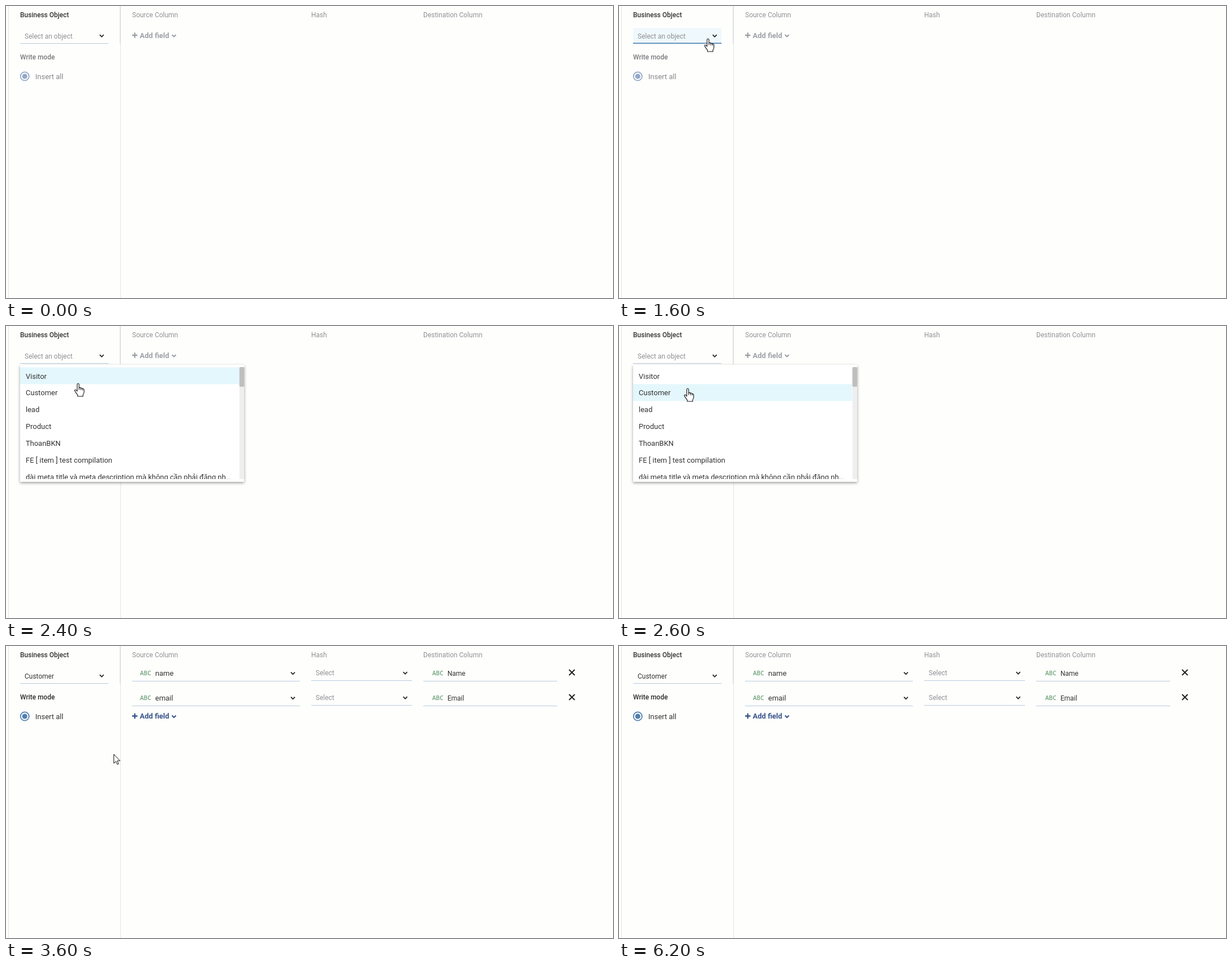
Write an HTML page that moves like this. It is 1078 by 519 pixels and loops after 7 s.

```html
<!DOCTYPE html>
<html lang="en">
<head>
<meta charset="utf-8">
<title>Field mapping</title>
<style>
  html, body { margin: 0; width: 100%; height: 100%; overflow: hidden; background: #fefefd; }
  svg { display: block; }
  text { font-family: Roboto, Arial, sans-serif; font-size: 12px; fill: #333; white-space: pre; }
  .big { font-size: 13px; }
  .med { font-weight: 500; }
  .bold { font-weight: 700; }
  .grey { fill: #8f9193; }
  .abc { font: 600 10px "Open Sans", sans-serif; fill: #6a9f78; }
  .line { stroke: #b9cbdf; }
  .rule { stroke: #e3e4e5; }
  .icon { fill: none; stroke: #222; stroke-width: 1.8; }
  .menu { filter: drop-shadow(0 2px 2.5px rgba(0, 0, 0, .38)); }
  #mode { --ink: #333; --radio: #5280af; --title: #2b2b2b; }
  #mode.off { --ink: #858789; --radio: #94a9c9; --title: #77797b; }
  #add { --add: #37548a; }
  #add.off { --add: #9da1a7; }
</style>
</head>
<body>
<svg id="stage" width="1078" height="519" viewBox="0 0 1078 519"></svg>
<script>
const LOOP = 7000;
const items = ["Visitor", "Customer", "lead", "Product", "ThoanBKN",
  "FE [ item ] test compilation",
  "dài meta title và meta description mà không cần phải đăng nh…"];

// start, cursor shape, x, y (pointer tip)
const moves = [
  [0, "", 0, 0],
  [600, "arrow", 100, 393],
  [800, "arrow", 147, 221],
  [1000, "arrow", 162, 105],
  [1200, "arrow", 162, 76],
  [1400, "hand", 158, 58],
  [2200, "hand", 141, 84],
  [2400, "hand", 128, 102],
  [2600, "hand", 122, 111],
  [3000, "arrow", 123, 113],
  [3200, "arrow", 132, 124],
  [3400, "arrow", 162, 158],
  [3600, "arrow", 191, 192],
  [3800, "arrow", 205, 217],
  [4200, "arrow", 208, 228],
  [4400, "arrow", 218, 258],
  [4600, "arrow", 227, 289],
  [4800, "arrow", 234, 304],
  [5000, "arrow", 236, 310],
  [6200, "", 0, 0]
];

const text = (x, y, s, cls = "") => `<text x="${x}" y="${y}" class="${cls}">${s}</text>`;
const line = (x1, x2, y) => `<path class="line" d="M${x1} ${y + .5}H${x2}"/>`;
const rule = (x, h, color = "#e3e4e5") => `<path d="M${x + .5} 0V${h}" stroke="${color}"/>`;
const chevron = (x, y, style = "") =>
  `<path class="icon" style="${style}" d="M${x - 3.5} ${y - 1.8}L${x} ${y + 1.8}L${x + 3.5} ${y - 1.8}"/>`;
const cross = (x, y) =>
  `<path class="icon" d="M${x - 5} ${y - 5}l10 10m0 -10l-10 10" style="stroke-width:2"/>`;

const field = (y, from, to) =>
  text(238, y + 4, "ABC", "abc") + text(265, y + 5, from, "big") +
  chevron(509.5, y + .5) + line(224, 522, y + 14) +
  text(550, y + 4, "Select", "grey") + chevron(709, y) + line(542, 721, y + 13) +
  text(757, y + 4, "ABC", "abc") + text(784, y + 5, to) + line(741, 979, y + 14) +
  cross(1005, y - 1);

const menu = `
  <rect class="menu" x="25" y="69" width="398" height="208" fill="#fff"/>
  <rect id="mark" x="25" width="389" height="30" fill="#e4f7fc"/>
  <g clip-path="url(#list)">${items.map((s, i) => text(35, 93.5 + i * 29.85, s, "big")).join("")}</g>
  <rect x="414.5" y="73" width="8.5" height="199" fill="#efefef"/>
  <rect x="414.5" y="73" width="8.5" height="35" rx="2" fill="#bfbfbf"/>`;

stage.innerHTML = `
  <defs><clipPath id="list"><rect x="25" y="73" width="389" height="199"/></clipPath></defs>
  ${rule(4, 519)}${rule(203, 519)}${rule(202, 67, "#d9dbdd")}
  ${text(25, 20, "Business Object", "med")}
  ${text(224, 20, "Source Column", "grey")}
  ${text(542, 20, "Hash", "grey")}
  ${text(741, 20, "Destination Column", "grey")}
  <rect id="glow" x="25" y="39" width="157" height="27" fill="#eff8fd"/>
  ${line(25, 182, 66)}
  <path id="focus" d="M25 66.3H182" stroke="#3c78ad" stroke-width="1.6"/>
  <g id="empty">${text(33, 57.5, "Select an object", "grey")}</g>
  <g id="chosen">${text(33, 57.5, "Customer")}</g>
  ${chevron(170, 53)}
  <g id="mode">
    <text x="25" y="95" class="med" style="fill:var(--title)">Write mode</text>
    <circle cx="33.3" cy="125" r="7.6" fill="none" style="stroke:var(--radio)" stroke-width="1.8"/>
    <circle cx="33.3" cy="125" r="4.6" style="fill:var(--radio)"/>
    <text x="52" y="130" class="big" style="fill:var(--ink)">Insert all</text>
  </g>
  <g id="fields">${field(48, "name", "Name")}${field(92, "email", "Email")}</g>
  <g id="add">
    <path d="M224 52H233.4M228.7 47.3V56.7" style="stroke:var(--add)" stroke-width="2.3"/>
    <text x="237.5" y="56.5" class="big bold" style="fill:var(--add)">Add field</text>
    ${chevron(298.3, 52.7, "stroke:var(--add);stroke-width:2.1")}
  </g>
  <g id="menu">${menu}</g>
  <g id="arrow" fill="#fff" stroke="#111">
    <path d="M.5 .5V16.5L4.2 13L6.7 18.5L9 17.5L6.6 12H11.5Z"/>
  </g>
  <g id="hand" fill="#fff" stroke="#111" stroke-width="1.1" stroke-linejoin="round">
    <path d="M-1.6 2Q-1.5 .3 0 .3T1.7 2V7.8Q4.4 6.6 5 8.6Q7.5 7.7 8 9.6Q10.5 9.2 10.6 11.6V15.5Q10.4 18 8.8 20V23H-.8V20.6L-5.7 13.6Q-6.5 11.6 -5 11.2Q-3.6 11 -1.6 14Z"/>
    <path d="M1.7 7.5V11.5M5 8.6V12M8 9.6V12.5" fill="none"/>
  </g>`;

const el = id => document.getElementById(id);
const show = (id, on) => el(id).setAttribute("visibility", on ? "visible" : "hidden");
const between = (t, a, b) => t >= a && t < b;

function draw(t) {
  const [, shape, x, y] = moves.filter(m => m[0] <= t).pop();
  for (const id of ["arrow", "hand"]) {
    show(id, id === shape);
    el(id).setAttribute("transform", `translate(${x} ${y})`);
  }
  const open = between(t, 1800, 3000), hover = between(t, 1400, 2200), ready = t >= 3600;
  show("glow", hover);
  show("focus", hover);
  show("menu", open);
  show("mark", open && t >= 2200);
  el("mark").setAttribute("y", t < 2600 ? 73.5 : 103.3);
  show("empty", t < 3000);
  show("chosen", t >= 3000);
  show("fields", ready);
  el("mode").classList.toggle("off", !ready);
  el("add").classList.toggle("off", !ready);
  el("add").setAttribute("transform", `translate(0 ${ready ? 72.5 : 0})`);
}

const start = performance.now();
function tick() {
  draw((performance.now() - start) % LOOP);
  requestAnimationFrame(tick);
}
tick();
</script>
</body>
</html>
```
